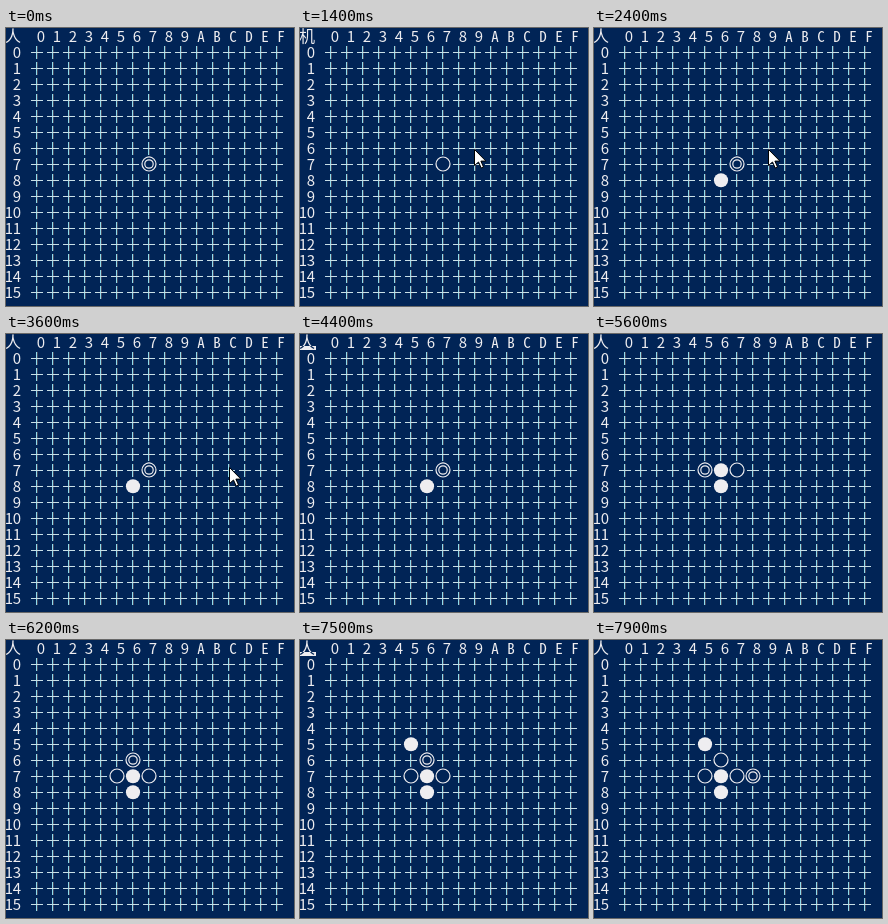
Recreate the animation shown at these times as an HTML page with a canvas. Size 288 by 278 pixels, loop 8000 ms.

```html
<!DOCTYPE html>
<html lang="zh">
<head>
<meta charset="utf-8">
<style>
  html, body { margin: 0; width: 100%; height: 100%; overflow: hidden; background: #012456; }
  canvas { display: block; width: 288px; height: 278px; }
</style>
</head>
<body>
<canvas id="board" width="288" height="278"></canvas>
<script>
const LOOP = 8000, CELL = 16, SIZE = 16;
const BG = '#012456', INK = '#eeedf0';
const WIDE = '15px "Noto Sans CJK SC", "Noto Sans CJK", sans-serif';
const NARROW = '500 15px "Noto Sans Mono CJK SC", "Noto Sans Mono", monospace';
const HAN = '16px "Noto Sans CJK SC", "Noto Sans CJK", sans-serif';
const ctx = document.getElementById('board').getContext('2d');

// a stone is [appears, column, row, filled]; the others start with their time in ms
const stones = [[0, 7, 7, false], [2400, 6, 8, true], [4800, 5, 7, false],
                [5600, 6, 7, true], [6400, 6, 6, false], [6900, 5, 5, true]];
const selector = [[0, 7, 7], [4500, 6, 7], [4600, 5, 7], [5900, 5, 6],
                  [6200, 6, 6], [7600, 7, 6], [7700, 8, 6], [7900, 8, 7]];
const thinking = [[1400, 2400], [4800, 5600], [6400, 6900]];
const caret = [[4400, 4500], [6900, 7000], [7500, 7600]];
const pointer = [[0], [100, 276, 37], [200, 197, 104], [300, 174, 121], [3600, 223, 133], [3700]];

const latest = (steps, t) => steps.filter(s => s[0] <= t).pop();
const within = (spans, t) => spans.some(([a, b]) => t >= a && t < b);
const px = col => 31 + CELL * col;
const py = row => 24 + CELL * row;

function text(str, x, y, font, color = INK) {
  ctx.font = font;
  ctx.textAlign = 'center';
  ctx.textBaseline = 'alphabetic';
  ctx.fillStyle = color;
  ctx.fillText(str, x, y);
}

function rect(x, y, w, h, color) {
  ctx.fillStyle = color;
  ctx.fillRect(x, y, w, h);
}

function ring(x, y, r) {
  ctx.beginPath();
  ctx.arc(x, y, r, 0, Math.PI * 2);
  ctx.strokeStyle = INK;
  ctx.lineWidth = 1.2;
  ctx.stroke();
}

function drawGrid() {
  rect(0, 0, 288, 278, BG);
  for (let i = 0; i < SIZE; i++) {
    text(i.toString(16).toUpperCase(), 35 + CELL * i, 14, i < 10 ? WIDE : NARROW);
    [...String(i)].reverse().forEach((d, k) => text(d, 11 - 8 * k, py(i) + 6, WIDE));
    for (let j = 0; j < SIZE; j++) {
      // subpixel-rendered stroke: cyan on the left, a faint warm edge on the right
      rect(px(i), py(j) - 6, 1, 13, '#4a4a62');
      rect(px(i) - 1, py(j) - 6, 1, 13, '#8fdcec');
      rect(px(i) - 6, py(j), 12, 1, '#c8dfe6');
    }
  }
}

function drawPiece(col, row, filled, selected) {
  const x = px(col), y = py(row);
  rect(x - 8, y - 7, CELL, CELL, BG);
  if (filled) {
    ctx.beginPath();
    ctx.arc(x, y + 0.25, 7.1, 0, Math.PI * 2);
    ctx.fillStyle = INK;
    ctx.fill();
  } else {
    ring(x, y, 7);
    if (selected) ring(x, y, 4.2);
  }
}

function drawTurn(t) {
  const label = within(thinking, t) ? '机' : '人';
  text(label, 7, 13.5, HAN);
  if (!within(caret, t)) return;
  ctx.save();
  ctx.beginPath();
  ctx.rect(0, 12, 16, 4);
  ctx.clip();
  rect(0, 12, 16, 4, INK);
  text(label, 7, 13.5, HAN, BG);
  ctx.restore();
}

function drawPointer(x, y) {
  const arrow = [[0, 0], [0, 16], [4, 12.5], [6.7, 18.5], [9, 17.5], [6.4, 11.6], [11.4, 11.6]];
  ctx.beginPath();
  arrow.forEach(([dx, dy]) => ctx.lineTo(x + dx + 0.5, y + dy + 0.5));
  ctx.closePath();
  ctx.fillStyle = '#fff';
  ctx.fill();
  ctx.strokeStyle = '#000';
  ctx.lineWidth = 1;
  ctx.stroke();
}

function draw(t) {
  drawGrid();
  stones.filter(s => s[0] <= t).forEach(([, col, row, filled]) => drawPiece(col, row, filled));
  if (!within(thinking, t)) {
    const [, col, row] = latest(selector, t);
    drawPiece(col, row, false, true);
  }
  drawTurn(t);
  const [, x, y] = latest(pointer, t);
  if (x !== undefined) drawPointer(x, y);
}

const start = performance.now();
function frame() {
  draw((performance.now() - start) % LOOP);
  requestAnimationFrame(frame);
}
frame();
</script>
</body>
</html>
```
